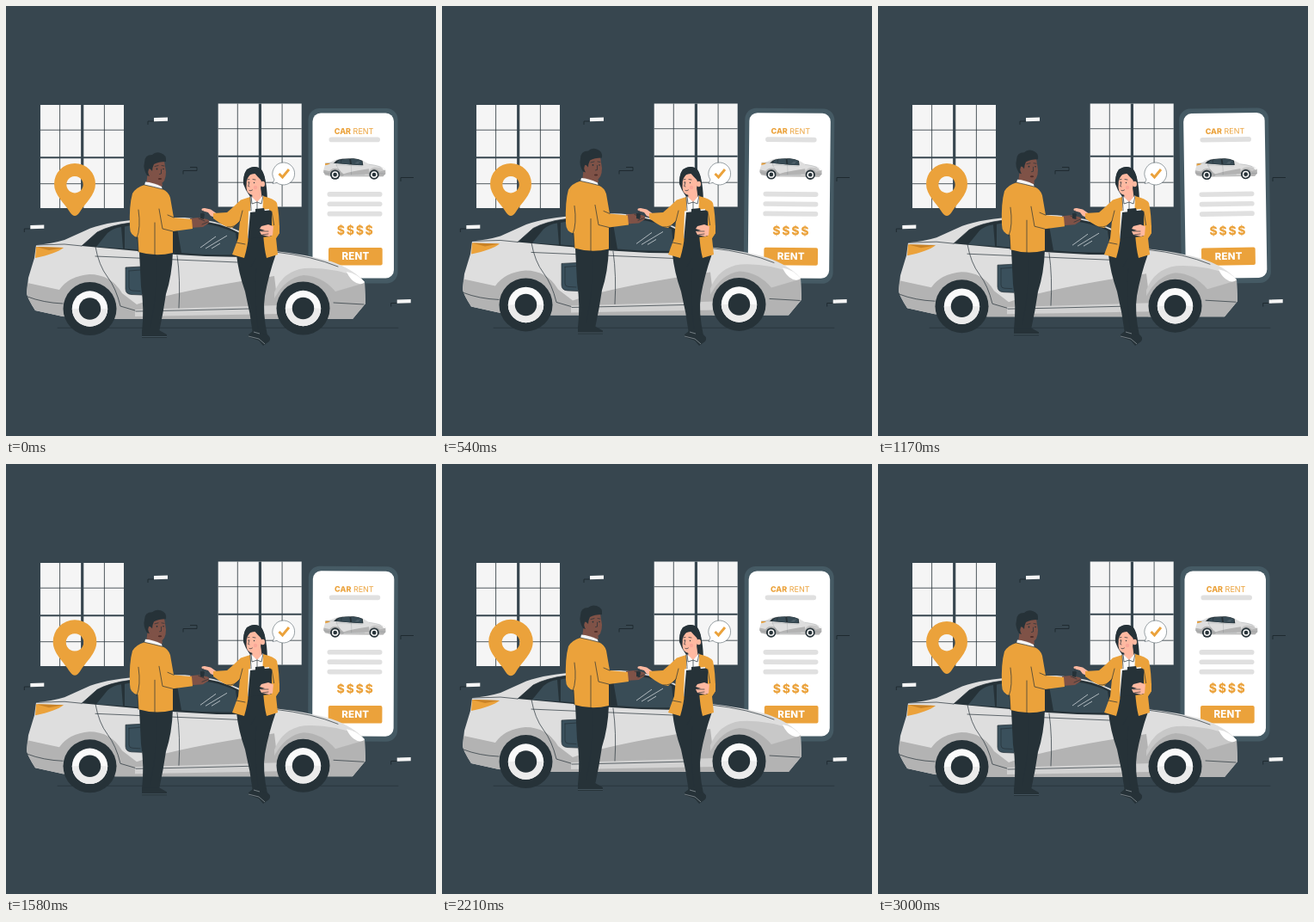
An HTML page that plays this animation: 500x500 px, repeating every 3.04 s.

```html
<!DOCTYPE html>
<html lang="en">
<head>
<meta charset="utf-8">
<title>Car rent</title>
<style>
  html, body { margin: 0; width: 100%; height: 100%; overflow: hidden; background: #37464f; }
  svg { display: block; width: 100vw; height: 100vh; font-family: Inter, "Open Sans", sans-serif; }
  .ink { fill: #263238; }
  .orange { fill: #eba23b; }
  .white { fill: #f5f5f5; }
  .bar { fill: #e0e0e0; }
  .shade { fill: #b3b3b3; }
  .skin { fill: #ffb9a1; }
  .brown { fill: #7f5247; }
  .line { fill: none; stroke: #263238; stroke-width: .7; stroke-linecap: round; stroke-linejoin: round; }
  .mark { fill: none; stroke: #1f2a30; stroke-width: 1; }
</style>
</head>
<body>
<svg viewBox="0 0 500 500">
  <defs>
    <g id="window">
      <path class="white" d="M0 0H97V120H0z"/>
      <path d="M22.6 0V120M74.4 0V120M0 29.2H97M0 91.7H97" stroke="#263238" stroke-width=".8"/>
      <path d="M48.700 0V120" stroke="#37464f" stroke-width="3.200"/>
      <path d="M0 61.2H97" stroke="#37464f" stroke-width="2"/>
    </g>
    <g id="tag">
      <path class="mark" d="M-7 8.500V4.500H0"/>
      <path class="white" d="M0 .5 16 0V4.2L0 4.800z"/>
    </g>
    <g id="wheel">
      <circle class="ink" r="31"/>
      <circle r="20.700" fill="#fafafa"/>
      <path d="M-20.700 0A20.700 20.700 0 0 0 20.700 0z" fill="#ebebeb"/>
      <circle class="ink" r="12.700"/>
    </g>
    <g id="car">
      <path fill="#dedede" d="M35 278Q53 276.500 68 272L98 258.500Q122 250 160 248Q186 245.500 208 246Q243 248 270 261Q290 272 313 285Q350 289 378 297Q404 306 417 321L418 346 403 364H128L66 361 34 354Q25 340 24 334L26 316 33 293z"/>
      <!-- shaded lower body -->
      <path class="shade" d="M25 322 62 330Q73 314 97 312Q122 312 135 334L152 347Q198 331 312 314L318 364H128L66 361 34 354Q25 340 24 334z"/>
      <path class="shade" d="M312 345Q318 314 346 312Q368 313 383 329L417 321 418 346 403 364H314z"/>
      <path fill="#c8c8c8" d="M312 333Q322 308 347 305Q377 303 412 316L417 322 383 332Q368 314 346 313Q325 316 312 340z"/>
      <path fill="#d2d2d2" d="M150 353 318 348V358L150 361z"/>
      <!-- glass -->
      <path class="ink" d="M88 279 106 263Q121 255 145 252Q190 247.500 216 248.500Q249 251 272 264L276 292Q236 292 197 289z"/>
      <path fill="#394c56" d="M105 280 118 264Q125 258 134 257L136 282zM138 256.500Q163 251 188 251L193 287 138 282zM198 252Q238 250 267 264L270 289Q235 290 204 287z"/>
      <path d="M226 281 244 268M232 282 257 267M239 282 249 276" stroke="#cfd5d8" stroke-width=".8"/>
      <!-- lights -->
      <path class="orange" d="M35 280 67 281Q58 288 34 293z"/>
      <path d="M35 280 67 281 50 284z" fill="#c98226"/>
      <path d="M396 309Q408 311 417 321Q412 326 404 320Q399 316 396 309z" fill="#fff"/>
      <path class="line" d="M88 279 106 263Q121 255 145 252M104 280Q108 302 118 315Q128 328 133 349L150 354M199 290Q203 318 201 351M151 355 201 354 284 352M104 291 269 298M313 286Q357 291 386 303M25 338Q43 345 66 346M35 278 68 277 88 279M381 345 416 347"/>
      <use href="#wheel" x="97.500" y="352"/>
      <use href="#wheel" x="345.500" y="351.500"/>
    </g>
  </defs>

  <rect width="500" height="500" fill="#37464f"/>
  <use href="#window" x="40" y="115"/>
  <use href="#window" x="246.700" y="113.500"/>
  <use href="#tag" x="172" y="129.500"/>
  <use href="#tag" x="28.300" y="254.500"/>
  <use href="#tag" x="454.700" y="341"/>
  <path class="mark" d="M206 195.500V191.500H222V187.500H214M459 204V199.500H474"/>
  <path class="line" d="M60 374.300H456"/>

  <path id="pin" class="orange" fill-rule="evenodd" d="M80 183A24 24 0 0 1 104 207C104 220 92 229 85.500 240Q80 248 74.500 240C68 229 56 220 56 207A24 24 0 0 1 80 183zM80 198a9.700 9.700 0 1 0 .01 0z"/>

  <g id="phone">
    <rect x="351.500" y="119" width="104" height="203.500" rx="13" fill="#455a64"/>
    <rect x="356.500" y="124.500" width="94.500" height="192" rx="9.500" fill="#fff"/>
    <text class="orange" x="404.600" y="148.700" font-size="9" text-anchor="middle"><tspan font-weight="800">CAR</tspan> RENT</text>
    <rect class="bar" x="375.500" y="152.500" width="59.500" height="5.700" rx="2.800"/>
    <use href="#car" transform="translate(364.800 131.700) scale(.183)"/>
    <g class="bar">
      <rect x="373.500" y="216" width="64" height="5.700" rx="2.800"/>
      <rect x="373.500" y="227.400" width="64" height="5.700" rx="2.800"/>
      <rect x="373.500" y="238.800" width="64" height="5.700" rx="2.800"/>
    </g>
    <text class="orange" x="406.700" y="266.300" font-size="14" font-weight="800" letter-spacing="1.700" text-anchor="middle">$$$$</text>
    <rect class="orange" x="375" y="281" width="62.700" height="20.500" rx="2"/>
    <text x="406.500" y="295" font-size="11.500" font-weight="800" letter-spacing=".2" text-anchor="middle" fill="#fff">RENT</text>
  </g>

  <g id="ride">
    <use href="#car"/>
    <!-- man -->
    <path fill="#3a505c" d="M139 304 158 303V336L146 335.500Q139 335 139 329z"/>
    <path class="line" d="M158 303 139 304V329Q139 335 146 335.500L158 336M143 308 156 307M143 308V327Q143 331 147 331L156 331.500"/>
    <path class="ink" d="M155 286 194 286Q193 314 186 335Q183 356 178 379H158Q161 352 157 326z"/>
    <path class="ink" d="M158 377 178 377 187 382V386H158z"/>
    <path d="M158 384.500H187" stroke="#52646d" stroke-width=".7"/>
    <path class="brown" d="M165 192 163 208 173 213 182 209 180 198z"/>
    <path class="brown" d="M165 185Q173 175 184 180L186 193Q186 205 179 207Q172 207 166 199z"/>
    <path class="ink" d="M164 197Q159 189 161 182Q161 173 170 173Q174 169 180 171Q187 173 186 181Q177 181 172 184Q170 188 170 192Q167 188 166 190Q164 193 167 198z"/>
    <path class="line" d="M173 186.500 177 185.500M181 185.500 184 186M180.500 190V195L178.500 195.500"/>
    <ellipse cx="179" cy="201" rx="2.200" ry="1" fill="#4d2d29"/>
    <circle class="ink" cx="175.500" cy="189.500" r=".9"/>
    <circle class="ink" cx="183" cy="189.500" r=".8"/>
    <path fill="#f5f5f5" d="M162 204.500Q171 205 181 210L182 214.500Q171 213.500 161 208.500z"/>
    <path class="brown" d="M214 247 224 246 234 248Q238 250 235 253L229 257 214 258z"/>
    <path class="orange" d="M161 208Q171 210 182 213Q189 216 191 223L195 246 216 248 217 259 194 262 194 287Q174 292 154 286L153 269Q144 267 144 257Q143 232 147 218Q151 211 161 208z"/>
    <path class="line" d="M152 270Q157 258 154 237M178 236 182 259 194 262M153 269 154 286M173 290V252M195 246 188 243M161 208Q171 210 182 213" stroke-width=".5"/>
    <path class="line" d="M175 293Q177 327 168 373" stroke="#4a5c66"/>
    <path class="line" d="M224 247 231 250M228 254 235 251"/>
  </g>

  <!-- check bubble -->
  <path d="M323.300 182A13 13 0 1 1 315 205.500L310 206.500 312 202A13 13 0 0 1 323.300 182z" fill="#fff" stroke="#37464f" stroke-width=".5"/>
  <path d="M317.500 195 321.500 199 329 190" fill="none" stroke="#eba23b" stroke-width="2.900"/>

  <!-- woman -->
  <path class="ink" d="M276 207Q275 188 289 187Q298 187 301 200L303 233H291L279 214z"/>
  <path class="skin" d="M287 214 296 211 298 226 292 232 286 224z"/>
  <path class="skin" d="M280 199Q284 195 290 195Q297 197 297 207Q296 218 287 220Q280 219 279.500 211z"/>
  <path class="ink" d="M277.500 208Q280 200 287 192Q292 198 297 203L300 225 304 232Q304 201 297 190Q289 184 280 190Q275 197 277.500 208z"/>
  <ellipse class="skin" cx="298.500" cy="207" rx="2.500" ry="3.300"/>
  <circle cx="290" cy="211" r="2.200" fill="#f28f8f" opacity=".4"/>
  <path class="line" d="M280.500 202 283 201.500M287 201.500 290 202M283 205 281.700 209.500 283 210M283 214.500Q285 215.500 286.500 214" stroke-width=".6"/>
  <circle class="ink" cx="282" cy="205" r=".7"/>
  <circle class="ink" cx="288.500" cy="205.500" r=".7"/>
  <path fill="#fafafa" d="M285 221 292 228 299 220 303 240 300 268H281L279 232z"/>
  <path class="line" d="M285 221 286 230 292 228 297 230 299 221M292 228V238" stroke-width=".5"/>
  <path class="ink" d="M276 268H306L314 288Q305 314 301 337Q298 356 304 383L287 381Q284 357 278 332Q270 309 268 289z"/>
  <path class="line" d="M290 294 285 303M291 306Q288 335 293 375" stroke="#4a5c66" stroke-width=".5"/>
  <path class="ink" d="M287 378 304 382Q309 386 306 390L299 395 294 389 282 385V382z"/>
  <path d="M282 384 294 387 301 393M288 379 295 381" fill="none" stroke="#aab3b8" stroke-width=".6"/>
  <path class="skin" d="M246 242 238 236.500 231 235Q226 235 228 238L235 240 238 244 245 247z"/>
  <path class="line" d="M229 238V246" stroke-width="1.500"/>
  <path class="ink" d="M226 241 231 241.500 230 248 226 247z"/>
  <path class="orange" d="M284 222 273 225.500 265 233 257 240 241 241 241 247Q257 259 263 258L272 250 270 270 263 289 277 293Q285 267 284 222zM299 221Q312 224 315 229Q318 242 318 264L314 270 316 289 303 293Q297 270 299 221z"/>
  <path class="line" d="M272 250 275 238M284 222Q287 251 282 272M257 257Q267 258 272 250M309 239 312 257M268 275 278 277" stroke-width=".5"/>
  <path fill="#f5f5f5" d="M282 238.500 306 236V266L281 270z"/>
  <path class="ink" d="M284 240 306 237.500Q309 237 309 240V266Q309 268 307 268L282 270.500Q281 270 281.500 268z"/>
  <path class="ink" d="M290 236 300 235 301 239 290 240z"/>
  <path class="skin" d="M297 256 305 254 313 257 314 265 306 268 297 266 295 262 301 261 295 259z"/>
  <path class="line" d="M297 262H305M298 266 305 265" stroke-width=".4"/>
  <path class="orange" d="M311 255H318V264L314 270 310 267z"/>
</svg>
<script>
  const LOOP = 3040, CYCLE = 1500, TICK = 1000 / 24;
  const [pin, phone, ride] = ["pin", "phone", "ride"].map(id => document.getElementById(id));

  // Linear interpolation through [phase, value] stops
  function along(stops, p) {
    const i = Math.max(1, stops.findIndex(s => s[0] >= p));
    const [a, b] = [stops[i - 1], stops[i]];
    return a[1] + (b[1] - a[1]) * (p - a[0]) / (b[0] - a[0]);
  }
  const FLOAT = [[0, 0], [.5, -6.3], [1, 0]];
  const SWAY = [[0, 0], [.25, 1], [.75, -1], [1, 0]];
  const BEAT = [[0, 1], [.1, 1.1], [.3, 1], [.4, 1], [.5, 1.1], [.6, 1], [1, 1]];

  const start = performance.now();
  function draw() {
    const t = (performance.now() - start) % LOOP;
    const step = Math.floor((t + 5) / TICK); // the motion runs at 24 steps a second
    const p = step % 36 * TICK / CYCLE;
    ride.setAttribute("transform", `translate(0 ${along(FLOAT, p)})`);
    phone.setAttribute("transform", `rotate(${along(SWAY, p)} 403.5 220.5)`);
    pin.setAttribute("transform", `translate(80 213.5) scale(${along(BEAT, p)}) translate(-80 -213.5)`);
    requestAnimationFrame(draw);
  }
  draw();
</script>
</body>
</html>
```
